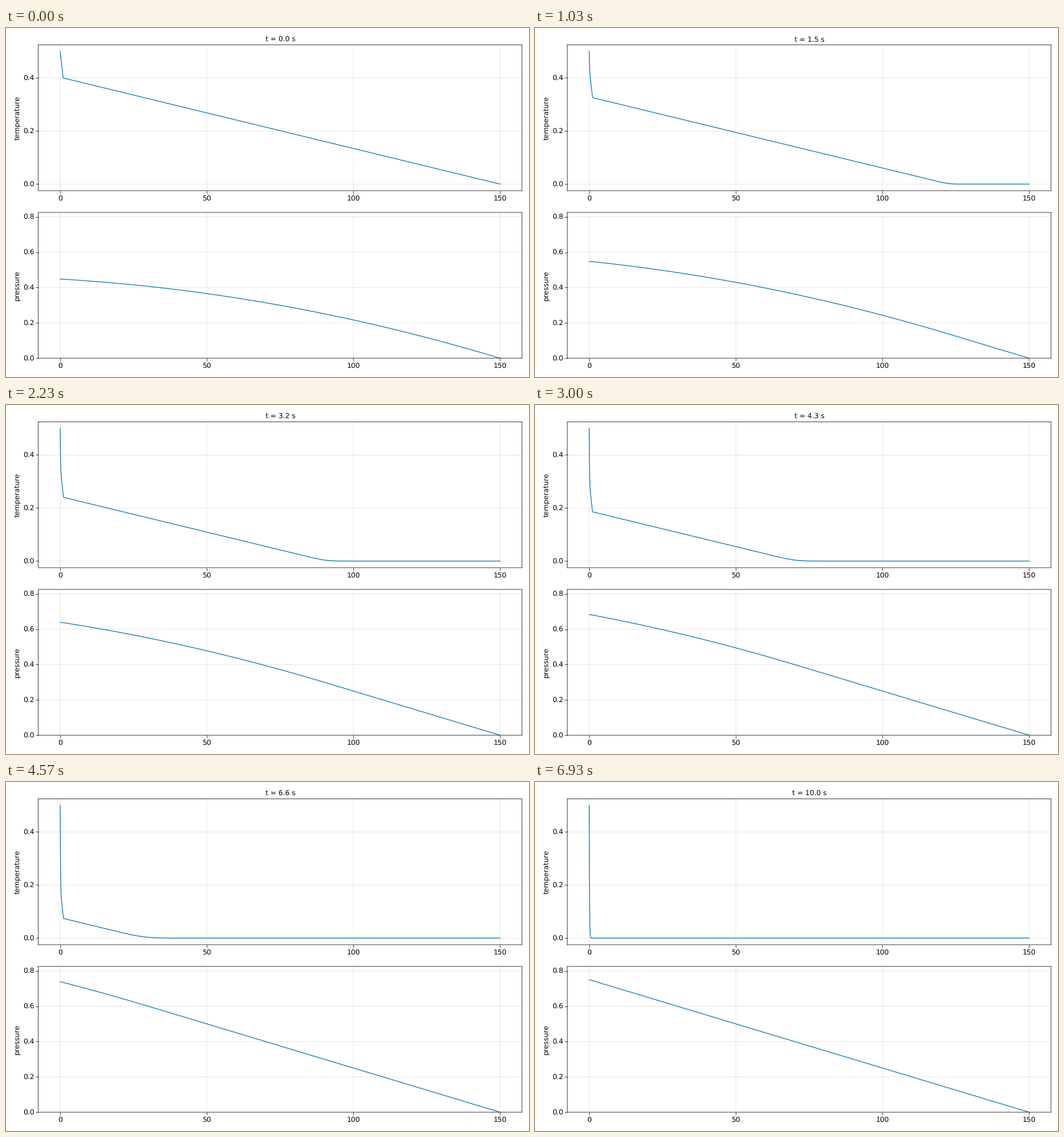
Recreate the animation shown at these times as a matplotlib script. Size 917 by 611 pixels, loop 7.01 s.

```python
import math

import matplotlib.pyplot as plt
import numpy as np
from matplotlib.animation import FuncAnimation

W, H, DPI = 917, 611, 100
DRAWS, LOOP_MS = 351, 7010
STEPS, T_END = 210, 10.0
LENGTH = 150.0

SLOPE = 0.4 / 149       # temperature gradient in the long section
WALL_SLOPE = 0.1        # gradient in the thin inlet section
COOLING = 0.0497        # temperature lost per second
DIFFUSION = 1.45
LAYER = 0.1             # thickness of the layer at the hot wall

plt.rcParams.update({
    "font.family": "DejaVu Sans",
    "font.size": 8.8,
    "text.hinting": "none",
    "path.snap": False,
    "axes.linewidth": 0.55,
    "axes.axisbelow": True,
})

x = np.concatenate([np.linspace(0, 2, 201), np.linspace(2, LENGTH, 500)[1:]])
erf = np.vectorize(math.erf)


def smooth_ramp(u, s):
    """max(u, 0) blurred by a Gaussian of width s."""
    z = u / s
    pdf = np.exp(-z * z / 2) / math.sqrt(2 * math.pi)
    return s * pdf + u * (1 + erf(z / math.sqrt(2))) / 2


def temperature(t):
    kink = 1 + 0.12 * min(1, t / 0.25)
    u = SLOPE * (LENGTH - x) - COOLING * t
    u += (WALL_SLOPE - SLOPE) * np.maximum(kink - x, 0)
    blur = SLOPE * math.sqrt(2 * DIFFUSION * t) + 1e-6
    temp = smooth_ramp(u, blur)
    return temp + (0.5 - temp[0]) * np.exp(-x / LAYER)


def pressure(temp):
    grad = 0.005 * (1 - 2 * temp)
    steps = (grad[1:] + grad[:-1]) / 2 * np.diff(x)
    return np.append(np.cumsum(steps[::-1])[::-1], 0)


fig = plt.figure(figsize=(W / DPI, H / DPI), dpi=DPI, facecolor="white")


def panel(top, bottom, label, ylim, yticks):
    left, right = 56.5, 904.8
    ax = fig.add_axes([left / W, 1 - bottom / H,
                       (right - left) / W, (bottom - top) / H])
    ax.set(xlim=(-7.5, 157.5), ylim=ylim,
           xticks=[0, 50, 100, 150], yticks=yticks)
    ax.yaxis.set_major_formatter("{x:.1f}")
    ax.tick_params(length=3.5, width=0.55)
    ax.tick_params(axis="x", pad=2.5)
    ax.tick_params(axis="y", pad=1.2)
    ax.grid(color="black", alpha=0.12, linewidth=0.6)
    fig.text(23.2 / W, 1 - (top + bottom) / 2 / H, label, rotation=90,
             rotation_mode="anchor", ha="center", va="baseline")
    return ax.plot([], [], color="#0072B2", linewidth=0.9)[0]


temp_line = panel(29.4, 284.9, "temperature", (-0.025, 0.525), [0, 0.2, 0.4])
pres_line = panel(322.9, 578.1, "pressure", (0, 0.825),
                  [0, 0.2, 0.4, 0.6, 0.8])
title = fig.text(481 / W, 1 - 24 / H, "", ha="center", va="baseline")


def update(i):
    # the simulation advances 30 steps a second, drawn at 50 per second
    step = min((3 * i + 2) // 5, STEPS - 1)
    t = T_END * step / (STEPS - 1)
    temp = temperature(t)
    temp_line.set_data(x, temp)
    pres_line.set_data(x, pressure(temp))
    title.set_text(f"t = {t:.1f} s")
    return temp_line, pres_line, title


anim = FuncAnimation(fig, update, frames=DRAWS, interval=LOOP_MS / DRAWS,
                     repeat=True, repeat_delay=0)
plt.show()
```
